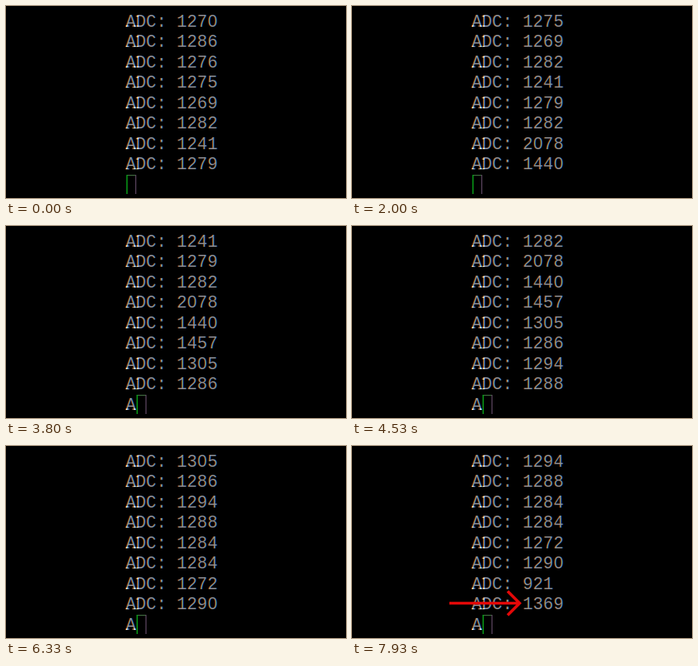
Recreate the animation shown at these times as an HTML page with a canvas. Size 426x240 px, loop 8 s.

```html
<!DOCTYPE html>
<html lang="en">
<head>
<meta charset="utf-8">
<title>ADC readings</title>
<style>
  html, body { margin: 0; width: 100%; height: 100%; overflow: hidden; background: #000; }
  canvas { display: block; width: 426px; height: 240px; }
</style>
</head>
<body>
<canvas id="screen" width="426" height="240"></canvas>
<script>
const ctx = document.getElementById('screen').getContext('2d');
const LOOP = 8000, ROWS = 8;
const LEFT = 150, TOP = 7, CELL = 12.8, PITCH = 25.5, BASE = 18.7;
const ECHO_DELAY = 130;   // pause before the next line's first letter
const ARROW_AT = 7930;

const values = [1270, 1286, 1276, 1275, 1269, 1282, 1241, 1279,
  1282, 2078, 1440, 1457, 1305, 1286, 1294, 1288, 1284, 1284,
  1272, 1290, 921, 1369];
// moments at which a line is completed and the log scrolls
const scrolls = [1000, 1470, 1930, 2470, 3000, 3530, 4000,
  4400, 4730, 5070, 5530, 6070, 6670, 7330];

// Slab feet for the capitals, hollow centre for zeros
function trimGlyph(ch, x, y) {
  if (ch === 'A') {
    ctx.fillRect(x + 0.2, y - 1.3, 4.2, 1.3);
    ctx.fillRect(x + 8.4, y - 1.3, 4.2, 1.3);
  } else if (ch === 'D') {
    ctx.fillRect(x + 0.3, y - 1.3, 3, 1.3);
    ctx.fillRect(x + 0.3, y - 13.6, 3, 1.3);
  }
}

function drawLine(text, row) {
  const y = TOP + row * PITCH + BASE;
  ctx.globalCompositeOperation = 'lighter';
  [['#900000', -0.5], ['#008e00', 0], ['#000094', 0.5]].forEach(([color, shift]) => {
    ctx.fillStyle = color;
    [...text].forEach((ch, i) => {
      const x = LEFT + i * CELL + shift;
      ctx.fillText(ch, x, y);
      trimGlyph(ch, x, y);
    });
  });
  ctx.globalCompositeOperation = 'source-over';
  ctx.fillStyle = '#000';
  [...text].forEach((ch, i) => {
    if (ch === '0') ctx.fillRect(LEFT + i * CELL + 4.4, y - 9.6, 4, 5.4);
  });
}

function drawCursor(col) {
  const x = LEFT + col * CELL, y = TOP + ROWS * PITCH;
  ctx.fillStyle = '#3f6b3f';
  ctx.fillRect(x + 1, y, 12, 1.2);
  ctx.fillStyle = '#08a018';
  ctx.fillRect(x + 0.8, y, 1.5, 24);
  ctx.fillStyle = '#5c4560';
  ctx.fillRect(x + 12, y, 1.2, 24);
}

function drawArrow() {
  ctx.strokeStyle = '#e40808';
  ctx.lineWidth = 3.6;
  ctx.beginPath();
  ctx.moveTo(122, 196.5);
  ctx.lineTo(210, 196.5);
  ctx.moveTo(195, 181.5);
  ctx.lineTo(210, 196.5);
  ctx.lineTo(195, 211.5);
  ctx.stroke();
}

function render(t) {
  const done = scrolls.filter(s => s <= t).length;
  const last = done ? scrolls[done - 1] : 0;
  const echoed = t - last >= ECHO_DELAY;

  ctx.fillStyle = '#000';
  ctx.fillRect(0, 0, 426, 240);
  ctx.font = '21.33px "Liberation Mono", "Courier New", monospace';
  values.slice(done, done + ROWS).forEach((v, row) => drawLine('ADC: ' + v, row));
  if (echoed) drawLine('A', ROWS);
  drawCursor(echoed ? 1 : 0);
  if (t >= ARROW_AT) drawArrow();
}

const start = performance.now();
function tick() {
  render((performance.now() - start) % LOOP);
  requestAnimationFrame(tick);
}
tick();
</script>
</body>
</html>
```
